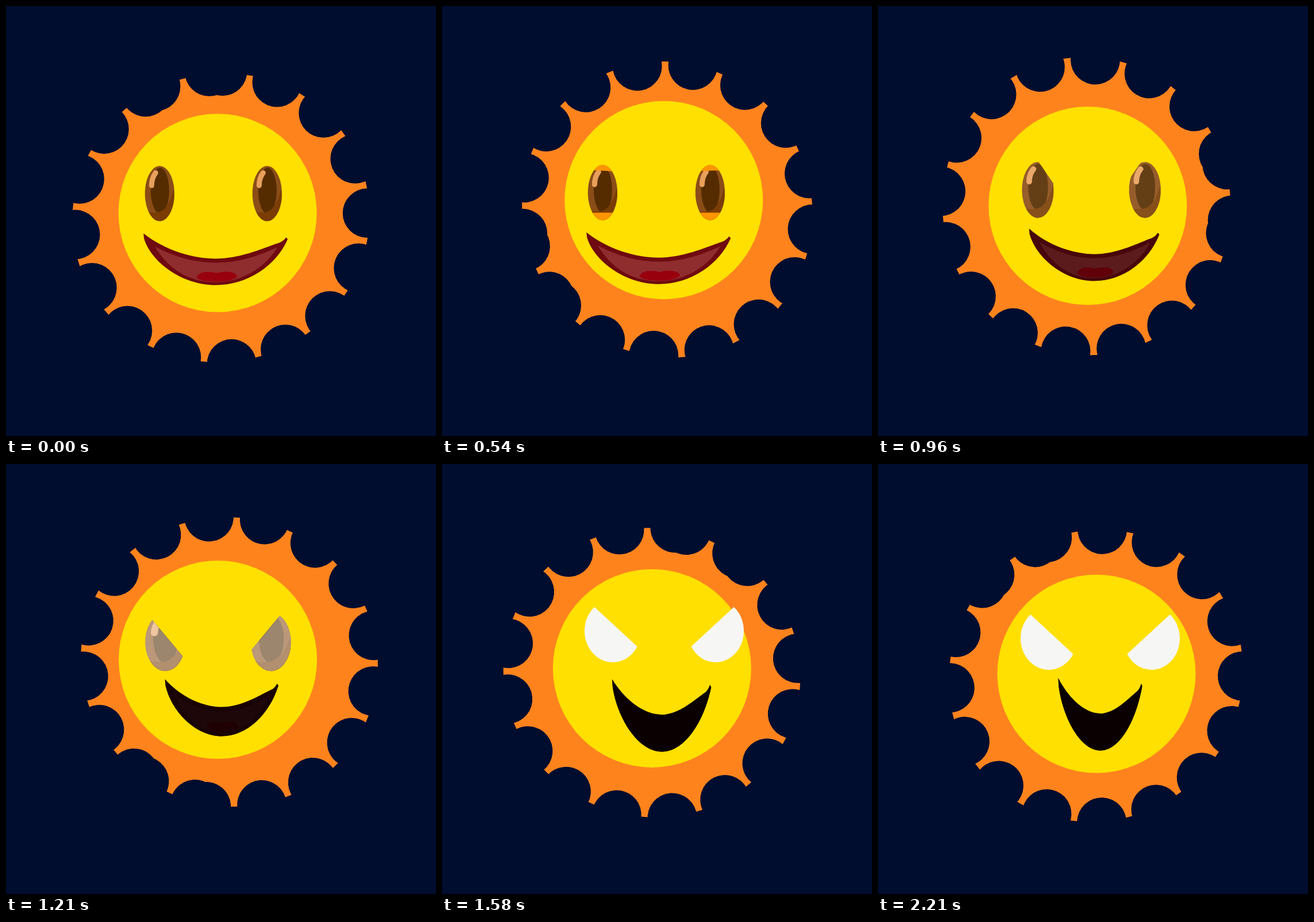
An HTML page with a canvas that plays this animation: 748x748 px, repeating every 2250 ms.

```html
<!DOCTYPE html>
<html lang="en">
<head>
<meta charset="utf-8">
<title>Sun</title>
<style>
html, body { margin: 0; width: 100%; height: 100%; overflow: hidden; background: #000d2f; }
canvas { display: block; width: 748px; height: 748px; }
</style>
</head>
<body>
<canvas id="stage" width="748" height="748"></canvas>
<script>
const ctx = document.getElementById('stage').getContext('2d');
const LOOP = 2250, FRAMES = 54, TURN = 18;
const NIGHT = '#000d2f', ORANGE = '#ff831d', YELLOW = '#ffe000', LID = '#ff9500';
const TAU = Math.PI * 2;

const rad = d => d * Math.PI / 180;
const mix = (a, b, u) => a + (b - a) * u;
const ramp = (n, from, to) => Math.min(1, Math.max(0, (n - from) / (to - from)));

// Path points are [frame, ...values], joined by straight lines.
function along(path, n) {
  let i = 0;
  while (i < path.length - 2 && n >= path[i + 1][0]) i++;
  const [from, ...a] = path[i], [to, ...b] = path[i + 1];
  return a.map((v, j) => mix(v, b[j], ramp(n, from, to)));
}

const discTurn = [[0, 139], [8, 223.6], [11, 223.6], [17, 446], [18, 499]];
const eyePath = [[18, 373, 328.7], [29, 369, 309.5], [38, 386.5, 290.3], [44, 386.5, 303.3]];
// centre x, top, width
const mouthPath = [[18, 376.3, 398, 250], [29, 374.8, 374.5, 196.5], [38, 381.8, 374.5, 171.5], [44, 386.3, 372.5, 145.5]];

const lips = new Path2D('M239 396C275 425 325 440 365 440C405 440 445 423 470 414Q482 411 487 403L490 406C470 452 420 486 365 486C305 486 252 445 240 405Z');
const inside = new Path2D('M259 419C295 438 330 447 365 447C405 447 440 435 472 420C455 450 415 481 365 481C315 481 280 455 259 419Z');
const tongue = new Path2D('M331 473C335 462 352 461 366 465C382 461 399 462 402 471C395 478 380 480 366 480C350 480 338 478 331 473Z');
const shade = new Path2D('M-27 30Q-8 36 4 30Q18 20 24 -8L30 60L-30 60Z');
const shine = new Path2D('M-14 -14Q-14 -27 -7 -36');

function fill(path, color) {
  ctx.fillStyle = color;
  ctx.fill(path);
}

function oval(x, y, rx, ry, color, tilt = 0) {
  ctx.fillStyle = color;
  ctx.beginPath();
  ctx.ellipse(x, y, rx, ry, tilt, 0, TAU);
  ctx.fill();
}

// An oval with round bites; the last two bites overlap others at the seam.
function drawRays(n) {
  ctx.save();
  ctx.translate(376.8, 353.6);
  ctx.rotate(n * TAU / TURN);
  ctx.translate(-3, 14.7);
  oval(0, 0, 259.5, 250.5, ORANGE, rad(-19));
  for (let i = 0; i < 18; i++) {
    const a = rad(0.6 + 21.9 * i - (i > 15 ? 17.4 : 0));
    oval(255 * Math.sin(a), -255 * Math.cos(a), 43, 43, NIGHT);
  }
  ctx.restore();
}

function drawDisc(n) {
  const a = rad(along(discTurn, n % TURN)[0]);
  oval(379 + 14.5 * Math.cos(a), 350.5 + 14.5 * Math.sin(a), 172.5, 172.5, YELLOW);
}

function drawLids(n, side) {
  const shut = Math.min(ramp(n, 5, 9), 1 - ramp(n, 10, 14));
  if (!shut) return;
  const top = -48 + 40 * shut, tilt = (side < 0 ? 6.5 : -4) * shut;
  ctx.fillStyle = LID;
  ctx.beginPath();
  ctx.moveTo(-27, -52);
  ctx.lineTo(27, -52);
  ctx.lineTo(27, top + tilt);
  ctx.lineTo(-27, top - tilt);
  ctx.fill();
  ctx.fillRect(-27, 48 - 52 * shut, 54, 60);
}

function drawIris() {
  ctx.fillStyle = '#8b4d17';
  ctx.fillRect(-30, -52, 60, 104);
  oval(0.5, -5, 16, 40, '#552c00');
  fill(shade, '#7b3d04');
  ctx.strokeStyle = '#e8a05c';
  ctx.lineWidth = 9;
  ctx.lineCap = 'round';
  ctx.stroke(shine);
}

function drawEye(n, side, x, y) {
  const grow = ramp(n, 18, 35.5) ** 2, white = ramp(n, 18, 34.5) ** 2;
  ctx.save();
  ctx.translate(x + side * mix(93.5, 89.5, grow), y);
  ctx.scale(mix(1, 1.907, grow), mix(1, 1.14, grow));

  // The brow cuts along a chord, mirrored and a little later on the right.
  const mid = side < 0 ? -0.88 : Math.PI + 0.88;
  const cut = 1.398 * ramp(side < 0 ? n : n - 2, 18, 29);
  ctx.beginPath();
  ctx.ellipse(0, 0, 25.7, 48, 0, mid + cut, mid - cut + TAU);
  ctx.closePath();
  ctx.clip();

  if (white < 1) drawIris();
  ctx.globalAlpha = white;
  ctx.fillStyle = '#f6f6f5';
  ctx.fillRect(-30, -52, 60, 104);
  ctx.globalAlpha = 1;
  drawLids(n, side);
  ctx.restore();
}

function drawMouth(n, dx, dy) {
  const [x, y, w] = along(mouthPath, n);
  ctx.save();
  ctx.translate(x + dx, y + dy);
  ctx.scale(w / 250, mix(1, 1.4, ramp(n, 18, 35.5) ** 3));
  ctx.translate(-364, -396);
  fill(lips, '#6e0a10');
  fill(inside, '#8f2c2e');
  fill(tongue, '#98000d');
  ctx.globalAlpha = ramp(n, 18, 31);
  fill(lips, '#0a0002');
  ctx.restore();
}

function drawFace(n) {
  const lean = 1 - ramp(n, 0, 18);
  const dx = -12.2 * lean ** 4;
  const dy = -2.4 * lean - 6 * Math.sin(Math.PI * lean) ** 2;
  const [x, y] = along(eyePath, n);
  for (const side of [-1, 1]) drawEye(n, side, x + dx, y + dy);
  drawMouth(n, dx, dy);
}

function draw(n) {
  ctx.fillStyle = NIGHT;
  ctx.fillRect(0, 0, 748, 748);
  drawRays(n);
  drawDisc(n);
  drawFace(n);
}

const start = performance.now();
function tick() {
  const t = (performance.now() - start) % LOOP;
  draw(Math.min(FRAMES - 1, Math.floor((t + 5) * FRAMES / LOOP)));
  requestAnimationFrame(tick);
}
tick();
</script>
</body>
</html>
```
